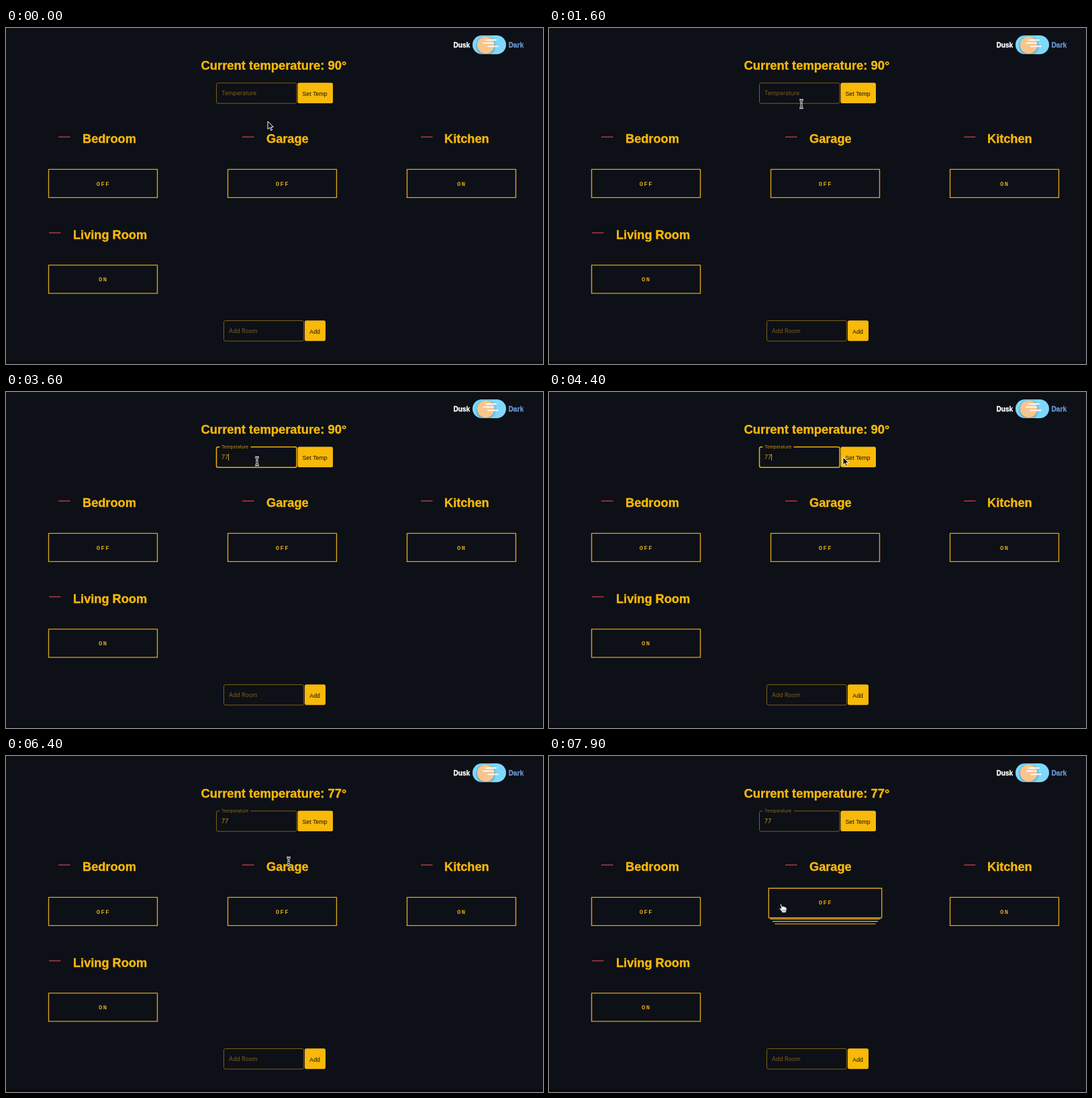
An HTML page with a canvas that plays this animation: 800x500 px, repeating every 8000 ms.

```html
<!DOCTYPE html>
<html lang="en">
<head>
<meta charset="utf-8">
<title>Room control</title>
<style>
html, body { margin: 0; width: 100%; height: 100%; overflow: hidden; background: #0d1017; }
canvas { display: block; }
</style>
</head>
<body>
<canvas id="stage" width="800" height="500"></canvas>
<script>
const ctx = document.getElementById('stage').getContext('2d');
const LOOP = 8000, STEP = 100;
const BG = '#0d1017', GOLD = '#f9b90a', LINE = '#dda21a', DIM = '#7d5f19', VALUE = '#c8950f';
const SANS = '"Liberation Sans", Arial, sans-serif';
const UI = 'Inter, Roboto, sans-serif';
const MONO = '"Liberation Mono", "Courier New", monospace';

const FOCUS = 1900, TYPE_1 = 2900, TYPE_2 = 3200, SUBMIT = 5000, BLUR = 5900, HOVER = 7620;

// time, x, y, pointer shape from this time on
const path = [
  [0, 390, 139, 'arrow'], [500, 389, 137, 'arrow'], [1000, 384, 127, 'arrow'],
  [1400, 377, 114, 'beam'], [1600, 376, 113, 'beam'], [1900, 372, 103, 'beam'],
  [2900, 372, 103, 'none'], [3600, 374, 103, 'beam'], [4100, 431, 98, 'arrow'],
  [4400, 438, 97, 'arrow'], [4500, 439, 97, 'arrow'], [4800, 449, 98, 'arrow'],
  [5400, 449, 99, 'arrow'], [5800, 530, 124, 'arrow'], [5900, 531, 126, 'arrow'],
  [6200, 469, 150, 'arrow'], [6400, 421, 157, 'beam'], [6600, 375, 152, 'arrow'],
  [6800, 358, 148, 'arrow'], [7200, 304, 183, 'arrow'], [7600, 322, 206, 'arrow'],
  [7700, 341, 221, 'hand'], [7900, 348, 226, 'hand'], [8000, 348, 226, 'hand']
];

const rooms = [
  { name: 'Bedroom', x: 114, y: 171, dash: 78, box: 63, state: 'OFF' },
  { name: 'Garage', x: 388, y: 171, dash: 352, box: 330, state: 'OFF' },
  { name: 'Kitchen', x: 653, y: 171, dash: 618, box: 597, state: 'ON' },
  { name: 'Living Room', x: 100, y: 313.5, dash: 64, box: 63, state: 'ON' }
];

const clamp = v => Math.max(0, Math.min(1, v));
const easeOut = v => 1 - (1 - clamp(v)) ** 3;
const mix = (a, b, k) => a + (b - a) * k;

function text(str, x, y, font, color, spacing = 0) {
  ctx.font = font;
  ctx.letterSpacing = spacing + 'px';
  ctx.fillStyle = color;
  ctx.fillText(str, x, y);
  ctx.letterSpacing = '0px';
}

function heading(str, x, y, size = 18.4, color = GOLD) {
  text(str, x, y, `bold ${size}px ${SANS}`, color);
  ctx.strokeStyle = color;
  ctx.lineWidth = 0.35;
  ctx.lineJoin = 'round';
  ctx.strokeText(str, x, y);
}

function roundRect(x, y, w, h, r) {
  ctx.beginPath();
  ctx.roundRect(x, y, w, h, r);
}

function line(x1, y1, x2, y2, color, width) {
  ctx.strokeStyle = color;
  ctx.lineWidth = width;
  ctx.beginPath();
  ctx.moveTo(x1, y1);
  ctx.lineTo(x2, y2);
  ctx.stroke();
}

function fillBox(x, y, w, h, r, color) {
  roundRect(x, y, w, h, r);
  ctx.fillStyle = color;
  ctx.fill();
}

function strokeBox(x, y, w, h, r, color, width) {
  roundRect(x, y, w, h, r);
  ctx.strokeStyle = color;
  ctx.lineWidth = width;
  ctx.stroke();
}

function toggle() {
  heading('Dusk', 666.5, 29, 10.1, '#ffffff');
  heading('Dark', 748.5, 29, 10.2, '#6a96d6');
  fillBox(695, 11, 50, 28, 14, '#7fd8fb');
  ctx.save();
  roundRect(695, 11, 50, 28, 14);
  ctx.clip();
  ctx.shadowColor = 'rgba(0,0,0,.4)';
  ctx.shadowBlur = 4;
  ctx.shadowOffsetY = 1;
  fillBox(702, 12.8, 25.4, 25.4, 12.7, '#f9c58e');
  ctx.restore();
  [[714, 17], [710.5, 21.6], [717, 26.6]].forEach(([x, y]) => fillBox(x, y, 16.7, 1.7, 0.8, '#ffffff'));
}

function temperatureField(t) {
  const active = t >= FOCUS && t < SUBMIT;
  const k = easeOut((t - FOCUS) / 200);
  const edge = active ? '#e9ae12' : DIM;
  strokeBox(313.5, 81.8, 119.5, 30.4, 2.5, edge, active ? 1.5 : 1);
  if (k > 0) {
    ctx.fillStyle = BG;
    ctx.fillRect(318.5, 80, 46 * k, 4);
  }
  text('Temperature', 321, mix(100, 83.7, k), `${mix(8.7, 6.7, k)}px ${UI}`,
    active ? VALUE : t < FOCUS ? DIM : '#8f6c17');

  const value = t < TYPE_1 ? '' : t < TYPE_2 ? '7' : '77';
  text(value, 321, 100, `8.8px ${UI}`, VALUE);
  const lastKey = t < TYPE_1 ? FOCUS : t < TYPE_2 ? TYPE_1 : TYPE_2;
  if (active && (t - lastKey) % 1000 < 500) {
    const x = 321.5 + value.length * 5;
    line(x, 92, x, 102, GOLD, 0.8);
  }
}

function formButton(label, x, y, w, textX, ring) {
  if (ring) {
    fillBox(x - 2, y - 2, w + 4, 34.5, 3.5, '#ffffff');
    fillBox(x - 0.8, y - 0.8, w + 1.6, 32.1, 2.5, '#151515');
  }
  fillBox(x, y, w, 30.5, 2.5, GOLD);
  text(label, textX, y + 19.9, `8.8px ${SANS}`, '#15120a');
}

function roomCard(room, lift) {
  const { name, x, y, dash, box, state } = room;
  line(dash, y - 8.8, dash + 17.5, y - 8.8, '#a5383d', 1.6);
  heading(name, x, y, 18.2);

  const grow = 3.2 * lift;
  const top = y + 39.4 - 13.6 * lift;
  if (lift > 0) {
    for (let i = 0; i < 3; i++) {
      const inset = mix(0, -0.6 + 3.5 * i, lift);
      const ly = mix(y + 81.4, y + 71.5 + 3.7 * i, lift);
      line(box + inset, ly, box + 163 - inset, ly, LINE, 1.4);
    }
  }
  ctx.fillStyle = BG;
  const left = box + 0.5 - grow, w = 162 + grow * 2, h = 42 + 2 * lift;
  ctx.fillRect(left, top, w, h);
  strokeBox(left, top, w, h, 0, LINE, 1.4);
  text(state, box + (state === 'ON' ? 75 : 71.7), y + 63.7 - 13.6 * lift, `bold 8.9px ${MONO}`, LINE, 1.4);
}

function polygon(points) {
  ctx.beginPath();
  points.forEach(([x, y]) => ctx.lineTo(x, y));
  ctx.closePath();
}

function arrow() {
  polygon([[0, 0], [0, 11.5], [2.7, 9], [4.7, 13.6], [6.6, 12.8], [4.7, 8.4], [8.3, 8.2]]);
  ctx.fillStyle = '#050505';
  ctx.strokeStyle = '#ffffff';
  ctx.lineWidth = 1;
  ctx.fill();
  ctx.stroke();
}

function beam() {
  ctx.beginPath();
  for (const s of [-1, 1]) {
    ctx.moveTo(-2.8, 6 * s);
    ctx.quadraticCurveTo(0, 6 * s, 0, 4 * s);
    ctx.quadraticCurveTo(0, 6 * s, 2.8, 6 * s);
  }
  ctx.moveTo(0, -5);
  ctx.lineTo(0, 5);
  ctx.moveTo(-1.8, 1.5);
  ctx.lineTo(1.8, 1.5);
  for (const [color, width] of [['#f4f4f4', 2.8], ['#111111', 0.9]]) {
    ctx.strokeStyle = color;
    ctx.lineWidth = width;
    ctx.stroke();
  }
}

function hand() {
  polygon([[-3.6, -5.5], [-2, -6], [-0.6, -1.8], [1, -2.5], [2, -1.5], [3.6, -2], [4.4, -0.8],
    [5.6, -0.8], [6.2, 2], [5, 7], [-0.5, 7.2], [-2, 4.5], [-5, 1.2], [-4, 0], [-2, 1.2]]);
  ctx.fillStyle = '#ffffff';
  ctx.strokeStyle = '#111111';
  ctx.lineWidth = 0.8;
  ctx.fill();
  ctx.stroke();
  [0.2, 2, 3.8].forEach(x => line(x, 2.4, x + 0.2, 5.2, '#333333', 0.6));
}

function pointer(t) {
  const i = path.findIndex((p, n) => n + 1 < path.length && t < path[n + 1][0]);
  const [t0, x0, y0, shape] = path[i], [t1, x1, y1] = path[i + 1];
  const k = (t - t0) / (t1 - t0);
  ctx.save();
  ctx.translate(mix(x0, x1, k), mix(y0, y1, k));
  ctx.lineJoin = 'round';
  if (shape === 'arrow') arrow();
  if (shape === 'beam') beam();
  if (shape === 'hand') hand();
  ctx.restore();
}

function draw(t) {
  ctx.fillStyle = BG;
  ctx.fillRect(0, 0, 800, 500);
  ctx.fillStyle = '#0b0b14';
  ctx.fillRect(0, 496, 800, 4);

  toggle();
  heading(`Current temperature: ${t < SUBMIT ? 90 : 77}°`, 290.5, 62);
  temperatureField(t);
  formButton('Set Temp', 434.5, 81.5, 52.5, 441.5, t >= SUBMIT && t < BLUR);

  rooms.forEach(room => {
    const lift = room.name === 'Garage' ? easeOut((t - HOVER) / 250) : 0;
    roomCard(room, lift);
  });

  strokeBox(324.5, 435.5, 119, 30.4, 2.5, DIM, 1);
  text('Add Room', 332, 454, `8.7px ${UI}`, DIM);
  formButton('Add', 445, 435.2, 31, 452.3, false);
  pointer(t);
}

function tick() {
  draw(Math.floor(performance.now() % LOOP / STEP) * STEP);
  requestAnimationFrame(tick);
}
tick();
</script>
</body>
</html>
```
